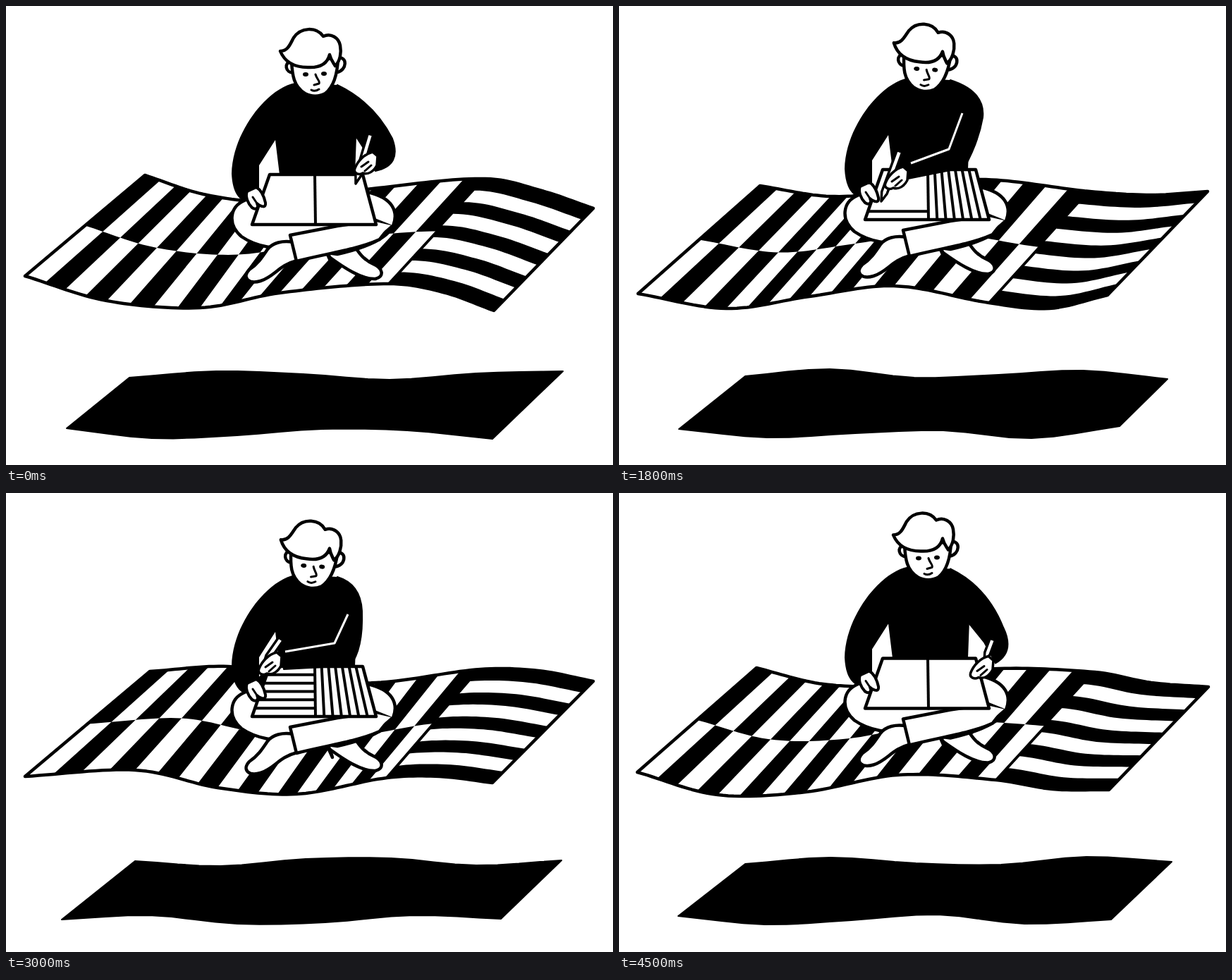
Recreate the animation shown at these times as an HTML page. Size 861 by 651 pixels, loop 4.8 s.

```html
<!DOCTYPE html>
<html lang="en">
<head>
<meta charset="utf-8">
<title>Flying carpet</title>
<style>
  html, body { margin: 0; width: 100%; height: 100%; overflow: hidden; background: #fff; }
  svg { display: block; width: 100%; height: 100%; }
  .ink { fill: #fff; stroke: #000; stroke-width: 4.5; stroke-linejoin: round; stroke-linecap: round; }
  .line { fill: none; stroke: #000; stroke-width: 4; stroke-linecap: round; stroke-linejoin: round; }
  .thin { stroke-width: 3; }
</style>
</head>
<body>
<svg viewBox="0 0 861 651">
  <path id="shadow" stroke="#000" stroke-width="2" stroke-linejoin="round"/>
  <path id="cloth" class="ink"/>
  <path id="stripes"/>
  <path id="seam" class="line"/>

  <g id="rider">
    <g class="ink">
      <path d="M460 357C478 370 504 388 524 387C537 384 535 372 521 366C508 360 502 352 496 343L455 350Z"/>
      <path d="M455 350L463 368L460 358" fill="none"/>
      <path d="M338 276C317 285 314 310 334 327C354 341 384 346 412 344L470 352C510 343 540 331 549 312C557 292 549 272 513 264L400 250Z"/>
      <path d="M408 335C392 332 378 336 371 345C363 357 357 366 345 374C334 386 345 395 361 390C382 383 386 368 413 361Z"/>
      <path d="M470 312L403 325L412 362C455 351 500 345 530 331L545 312L525 304Z"/>
    </g>
    <path d="M490 309L520 305L546 311L524 330Z" fill="#fff"/>
    <path d="M410 109C395 112 380 122 366 136C345 157 321 196 320 238C321 256 325 270 337 277L359 258L359 226L382 190L388 239L495 239L497 186C496 150 486 124 470 112Z"/>
    <g id="head" class="ink">
      <path d="M404 79C394 80 396 95 408 95"/>
      <path d="M470 74C485 70 484 92 469 94"/>
      <path d="M405 78C406 98 408 114 424 124C433 129 444 129 453 124C464 115 470 100 471 74Z"/>
      <path d="M389 64C394 76 404 87 428 87C446 88 456 81 459 69C461 77 464 80 467 85C474 78 476 66 474 56C472 45 461 38 450 43C440 29 418 30 408 45C403 54 400 64 389 64Z"/>
      <g fill="#000" stroke="none">
        <ellipse cx="425" cy="97" rx="4" ry="3"/>
        <ellipse cx="451" cy="96" rx="4" ry="3"/>
      </g>
      <path class="line thin" d="M439 97C441 104 446 107 444 110L437 112M433 119Q438 122 444 118"/>
    </g>
    <path class="ink" d="M374 239L506 239L525 310L349 310Z"/>
    <path class="line" d="M438 239L439 310"/>
    <path id="rules" class="line" stroke-linecap="butt"/>
    <path id="leaf" class="ink"/>
    <path id="leafRules" class="line"/>
    <path class="ink" style="stroke-width:4" d="M342 263C339 270 343 280 349 286C355 290 359 286 356 280C362 285 369 287 368 279C366 270 362 261 355 257Z"/>
    <path class="line thin" d="M356 280L350 271"/>
    <path id="sleeve" stroke="#000" stroke-width="2" stroke-linejoin="round"/>
    <path id="crease" fill="none" stroke="#fff" stroke-width="3" stroke-linejoin="round"/>
    <path id="pencil" class="ink" style="stroke-width:3.5"/>
    <g id="hand">
      <path class="ink" style="stroke-width:3.5" d="M10 -15C-2 -12 -11 -2 -15 8C-18 16 -9 18 -4 15C4 18 12 12 16 4L17 -9Z"/>
      <path class="line thin" d="M-6 6L4 -1M-1 12L8 4"/>
    </g>
  </g>
</svg>
<script>
const STEP = 300, FRAMES = 16;
const $ = id => document.getElementById(id);
const draw = (id, d) => $(id).setAttribute('d', d);
const nums = s => s.trim().split(/\s+/).map(Number);
const pairs = a => a.flatMap((v, i) => i % 2 ? [] : [[v, a[i + 1]]]);
const mix = (a, b, t) => a + (b - a) * t;
const mixPt = (p, q, t) => [mix(p[0], q[0], t), mix(p[1], q[1], t)];
const poly = pts => 'M' + pts.map(p => p.map(v => v.toFixed(1)).join(' ')).join('L');

// Wave shapes at steps 0, 2, 4, 6 and 7 of the eight-step cycle.
const backEdge = [
  '197 240 285 268 385 277 520 259 680 245 760 262 833 287',
  '204 253 315 246 415 262 525 269 673 250 755 252 833 267',
  '190 274 310 249 420 256 535 276 650 279 740 264 820 246',
  '200 255 300 270 400 262 513 246 668 263 755 268 835 263',
  '195 248 290 271 390 272 515 250 675 254 755 269 836 275'].map(nums);
const frontEdge = [
  '27 383 143 418 275 428 388 407 543 394 620 406 692 432',
  '27 402 183 393 300 418 412 427 540 404 615 402 690 411',
  '12 432 172 402 283 405 395 423 517 431 600 419 675 397',
  '27 408 152 429 270 412 390 397 525 421 610 429 693 410',
  '26 396 140 428 265 424 395 400 535 407 615 420 695 421'].map(nums);
// Shadow edges: first x, last x, then evenly spaced heights.
const shadowBack = [
  '175 790 527 518 522 530 521 518', '183 788 522 529 519 518 528 521',
  '192 780 517 530 523 516 517 529', '179 778 525 515 527 523 517 529',
  '179 784 526 517 525 527 516 523'].map(nums);
const shadowFront = [
  '86 690 599 613 609 600 602 614', '79 702 605 599 611 609 599 604',
  '69 708 613 599 603 613 612 597', '85 710 600 612 606 602 613 596',
  '84 698 600 612 606 598 611 605'].map(nums);

function atStep(keys, k) {
  if (k === 7) return keys[4];
  if (k % 2 === 0) return keys[k / 2];
  const a = k * Math.PI / 4;
  return keys[0].map((p, i) => {
    const [q, r, s, last] = keys.slice(1).map(row => row[i]);
    const mean = (p + q + r + s) / 4;
    if (k === 3) return 2 * mean - last;
    return mean + (p - r) / 2 * Math.cos(a) + (q - s) / 2 * Math.sin(a);
  });
}

// Smooth curve through points placed at the given knots.
function curve(pts, knots) {
  const last = pts.length - 1;
  const slope = (i, c) => {
    const a = Math.max(0, i - 1), b = Math.min(last, i + 1);
    return (pts[b][c] - pts[a][c]) / (knots[b] - knots[a]);
  };
  return u => {
    let i = 0;
    while (i < last - 1 && u > knots[i + 1]) i++;
    const h = knots[i + 1] - knots[i], t = (u - knots[i]) / h;
    return [0, 1].map(c =>
      (1 + 2 * t) * (1 - t) ** 2 * pts[i][c] + t * (1 - t) ** 2 * h * slope(i, c) +
      t * t * (3 - 2 * t) * pts[i + 1][c] + t * t * (t - 1) * h * slope(i + 1, c));
  };
}

function patch(back, front, u0, u1, v0 = 0, v1 = 1) {
  const n = Math.ceil((u1 - u0) * 4), far = [], near = [];
  for (let i = 0; i <= n; i++) {
    const u = mix(u0, u1, i / n), b = back(u), f = front(u);
    far.push(mixPt(b, f, v0));
    near.unshift(mixPt(b, f, v1));
  }
  return poly([...far, ...near]) + 'Z';
}

const COLS = 17, END = 23, KNOTS = [0, 4, 8, 12, COLS, 20, END];
function drawCarpet(k) {
  const back = curve(pairs(atStep(backEdge, k)), KNOTS);
  const front = curve(pairs(atStep(frontEdge, k)), KNOTS);
  let d = '';
  for (let i = 0; i < COLS; i++) {
    const v = i % 2 / 2;
    d += patch(back, front, i, i + 1, v, v + .5);
  }
  for (let j = 0; j < 9; j += 2) d += patch(back, front, COLS, END, j / 9, (j + 1) / 9);
  draw('cloth', patch(back, front, 0, END));
  draw('stripes', d);
  draw('seam', poly([mixPt(back(COLS), front(COLS), .5), front(COLS)]));
}

function drawShadow(k) {
  const edge = keys => {
    const [x0, x1, ...ys] = atStep(keys, k);
    return curve(ys.map((y, i) => [mix(x0, x1, i / 5), y]), [0, 1, 2, 3, 4, 5]);
  };
  draw('shadow', patch(edge(shadowBack), edge(shadowFront), 0, 5));
}

// Arm poses: six sleeve points, three crease points, hand, pencil end, pencil tip.
const poses = {
  0: '522 137 548 188 562 226 524 234 510 206 497 186 520 205 520 205 520 205 510 222 517 182 496 252',
  2: '512 135 536 196 546 243 505 240 492 215 490 200 500 206 515 203 529 207 487 225 494 186 475 256',
  6: '520 128 516 165 510 200 490 236 405 253 398 236 487 159 468 210 414 230 393 250 398 213 372 284',
  8: '520 128 517 165 512 205 490 238 410 240 408 216 484 167 475 206 420 213 397 230 403 190 383 260',
  10: '503 122 505 160 507 215 488 238 394 243 393 222 485 165 466 206 396 218 374 234 390 200 365 236',
  12: '508 130 518 180 524 212 490 232 428 224 428 202 486 170 490 200 435 203 408 217 422 180 410 212',
  15: '522 137 545 195 562 230 534 246 518 216 497 190 520 205 520 205 520 205 514 251 530 212 518 244'
};
const poseTimes = Object.keys(poses).map(Number);

function poseAt(frame) {
  const a = poseTimes.filter(t => t <= frame).pop();
  const b = poseTimes.find(t => t > frame) ?? 0;
  const t = b ? (frame - a) / (b - a) : 0;
  const from = nums(poses[a]), to = nums(poses[b]);
  return pairs(from.map((v, i) => mix(v, to[i], t)));
}

function drawArm(frame) {
  const [k, e, l, w, v, a, c1, c2, c3, hand, top, tip] = poseAt(frame);
  draw('sleeve', `M470 112Q${k} ${e}Q${l} ${w}L${v}L${a}Z`);
  draw('crease', poly([c1, c2, c3]));
  $('hand').setAttribute('transform', `translate(${hand})`);
  const len = Math.hypot(tip[0] - top[0], tip[1] - top[1]);
  const n = [(tip[1] - top[1]) / len * 4, (top[0] - tip[0]) / len * 4];
  const neck = mixPt(top, tip, 1 - 13 / len);
  const side = (p, s) => [p[0] + s * n[0], p[1] + s * n[1]];
  draw('pencil', poly([side(top, 1), side(neck, 1), tip, side(neck, -1), side(top, -1)]) + 'Z');
}

const rightRules = [0, 1, 3, 4, 5, 6, 6, 6, 6, 6, 6, 6, 6, 6, 0, 0];
const leftRules = [0, 0, 0, 0, 0, 0, 1, 2, 3, 4, 5, 5, 0, 0, 0, 0];
const leaves = { 12: [[405, 226], [380, 266]], 13: [[458, 222], [484, 280]] };

function drawBook(frame) {
  let d = '';
  for (let i = 1; i <= rightRules[frame]; i++) {
    const t = 1 - i / 7;
    d += poly([[mix(438, 506, t), 239], [mix(439, 525, t), 310]]);
  }
  for (let i = 1; i <= leftRules[frame]; i++) {
    const t = 1 - i / 6, y = mix(239, 310, t);
    d += poly([[mix(374, 349, t), y], [438, y]]);
  }
  draw('rules', d);

  const leaf = leaves[frame], spine = [[438, 239], [439, 310]];
  draw('leaf', leaf ? poly([leaf[0], ...spine, leaf[1]]) + 'Z' : '');
  let lines = '';
  if (frame === 12) for (let i = 1; i < 7; i++)
    lines += poly([mixPt(...leaf, i / 7), mixPt(...spine, i / 7)]);
  draw('leafRules', lines);
}

const bob = [0, 5, 7, 5, 0, -5, -7, -4.5];
const tilt = [0, 0, 0, 1, 3, 5, 6, 6, 6, 6, 6, 4, 2, 1, 0, 0];
let shown = -1;

function tick(now) {
  const frame = Math.floor(now / STEP) % FRAMES;
  if (frame !== shown) {
    shown = frame;
    drawCarpet(frame % 8);
    drawShadow(frame % 8);
    drawBook(frame);
    drawArm(frame);
    $('rider').setAttribute('transform', `translate(0 ${bob[frame % 8]})`);
    $('head').setAttribute('transform', `rotate(${tilt[frame]} 434 70)`);
  }
  requestAnimationFrame(tick);
}
tick(performance.now());
</script>
</body>
</html>
```
